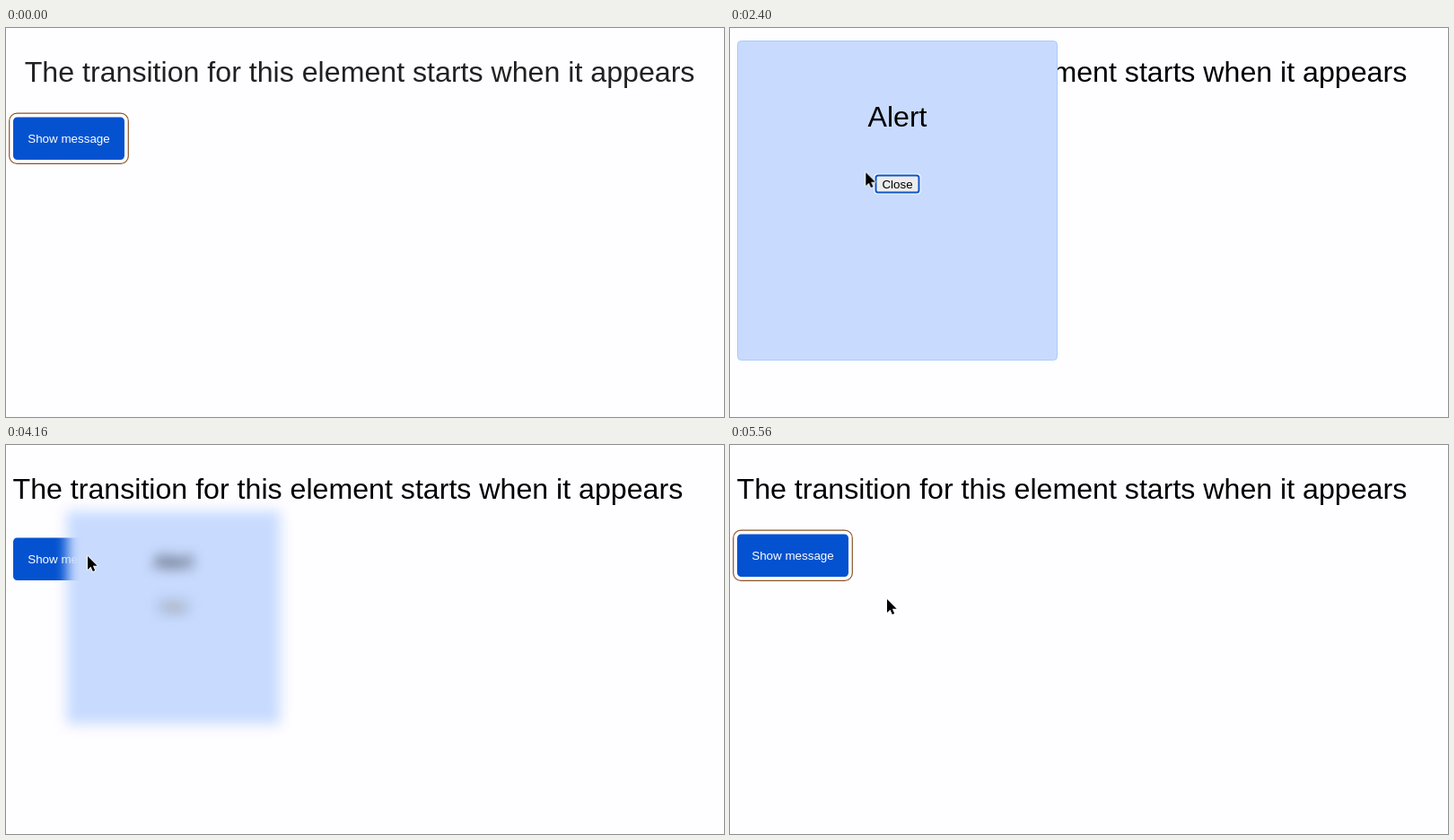
Animation, 800 px wide and 434 px high, one loop 5.6 s. Source, as an HTML page:

```html
<!DOCTYPE html>
<html lang="en">
<head>
<meta charset="utf-8">
<title>Entry transition</title>
<style>
  html, body { margin: 0; width: 100%; height: 100%; overflow: hidden; background: #fefdff; }
  svg { position: absolute; left: 0; top: 0; overflow: visible; }
  text { font-family: "Liberation Sans", Arial, sans-serif; }
  .big { font-size: 32.15px; }
  .small { font-size: 13.4px; }
  #dialog { transform-origin: 186.5px 192.5px; }
</style>
</head>
<body>
<svg width="800" height="434">
  <text id="heading" class="big" x="7.5" y="60">The transition for this element starts when it appears</text>
  <g id="button">
    <rect id="ring" x="3.7" y="95.2" width="132.6" height="56.2" rx="8.5" fill="none" stroke="#8a5526" stroke-width="1.2"/>
    <rect x="8" y="99.5" width="124" height="47.5" rx="4.5" fill="#0452d0"/>
    <text class="small" x="70" y="128" text-anchor="middle" fill="#fff">Show message</text>
  </g>
</svg>

<svg id="dialog" width="800" height="434">
  <rect x="8.5" y="14.5" width="356" height="356" rx="4" fill="#c8dbff" stroke="#a9cbfa"/>
  <text class="big" x="186.5" y="109.5" text-anchor="middle">Alert</text>
  <rect x="160.5" y="162.5" width="52" height="23" rx="4" fill="#fff"/>
  <rect id="close" x="162.5" y="164.5" width="48" height="19" rx="2.5" fill="#ececee" stroke="#0b55c8" stroke-width="2"/>
  <text class="small" x="186.5" y="179" text-anchor="middle">Close</text>
</svg>

<svg width="800" height="434">
  <g id="cursor" stroke-linejoin="round">
    <path id="arrow" d="M0 0V15L3.5 11.7 5.8 17.1 8.2 16.1 5.9 10.8H10.7Z" stroke="#fff" paint-order="stroke" stroke-width="1.6"/>
    <g id="hand" fill="#fff" stroke="#111" stroke-width="1.1">
      <path d="M-3 2.2C-3.4 .4-1.2-.4-.4 1.3L1.6 5.6C2.2 4.6 4 4.6 4.4 5.8 5.2 5 6.8 5.2 7.1 6.4 8.2 5.8 9.6 6.4 9.7 7.8 10.3 10.6 9.3 12 8.6 16.5H1.2C.4 14-2.6 11.6-3.6 9.9-4.2 8.6-2.4 7.9-1.3 9.3L-.6 9.6Z"/>
      <path d="M2.2 10.2V13.6M4.4 10.2V13.6M6.6 10.2V13.6" fill="none" stroke-width=".9"/>
    </g>
  </g>
</svg>

<script>
const LOOP = 5600;

// Each step is [ms, value, easing towards the next step]
function track(id, steps, style) {
  const last = steps[steps.length - 1];
  const all = last[0] < LOOP ? [...steps, [LOOP, last[1]]] : steps;
  const frames = all.map(([ms, value, easing = 'linear']) =>
    ({ offset: ms / LOOP, easing, ...style(value) }));
  document.getElementById(id).animate(frames, { duration: LOOP, iterations: Infinity });
}

const HARD = 'steps(1, end)';
const hard = pairs => pairs.map(([ms, value]) => [ms, value, HARD]);
const opacity = value => ({ opacity: value });
const moveY = y => ({ transform: `translateY(${y}px)` });
const moveTo = ([x, y]) => ({ transform: `translate(${x}px, ${y}px)` });

// Heading settles from the tail of its entry transition
track('heading', [[0, 1, 'cubic-bezier(.25, .6, .57, 1)'], [311, 0]],
  k => ({ transform: `translateX(${13.3 * k}px)`, opacity: 1 - .13 * k }));

track('button', [
  [0, 0], [1080, 0, 'ease'], [1180, 4],
  [2260, 4, 'ease'], [2360, 7.5],
  [3060, 7.5, 'ease'], [3260, 0],
  [3800, 0, 'ease'], [3880, 4],
  [4420, 4, 'ease'], [4520, 7.5],
  [5200, 7.5, 'ease'], [5400, 0]
], moveY);
track('ring', hard([[0, 1], [1400, 0], [3120, 1], [3910, 0], [5260, 1]]), opacity);

// 0 = gone, 1 = fully open
track('dialog', [
  [0, 0], [1370, 0, 'ease'], [2070, 1],
  [2968, 1, 'ease'], [3274, 0],
  [3890, 0, 'ease'], [4590, 1],
  [5100, 1, 'ease'], [5400, 0]
], k => ({ transform: `scale(${k})`, filter: `blur(${30 * (1 - k)}px)` }));

track('cursor', [
  [0, [330, -24]], [700, [330, -24], 'ease-in-out'], [1180, [79, 111]],
  [2230, [79, 111], 'ease-in'], [2400, [151, 161], 'ease-out'], [2640, [194, 177]],
  [3470, [194, 177], 'ease-in-out'], [3880, [91, 124]],
  [4480, [91, 124], 'ease-in-out'], [4860, [168, 172]],
  [5300, [168, 172], 'ease-in-out'], [5480, [175, 172]]
], moveTo);

const over = hard([[0, 0], [2440, 1], [3160, 0], [4800, 1], [5240, 0]]);
track('hand', over, opacity);
track('arrow', over, on => opacity(1 - on));
track('close', over, on => ({ fill: on ? '#dfe2e7' : '#ececee' }));
</script>
</body>
</html>
```
